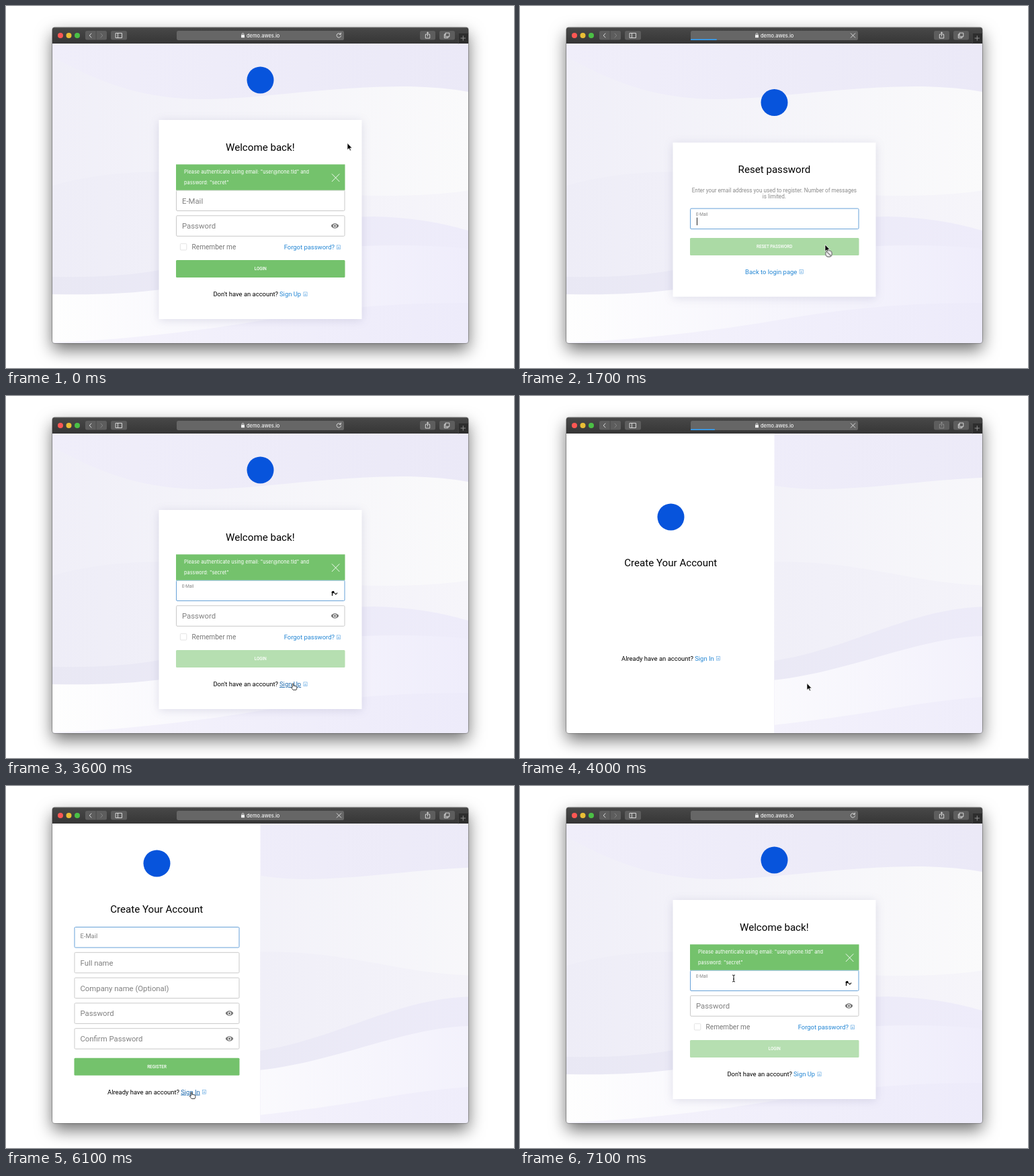
An HTML page for the animation above (7.2 s loop, 756 by 540 pixels).

```html
<!DOCTYPE html>
<html lang="en">
<head>
<meta charset="utf-8">
<title>Sign-in flow</title>
<style>
html, body { margin: 0; width: 100%; height: 100%; overflow: hidden; background: #fff; }
svg { display: block; width: 756px; height: 540px; font-family: Roboto, sans-serif; }
.ui { font-family: Inter, "Open Sans", sans-serif; }
.window { filter: drop-shadow(0 10px 12px rgba(0,0,0,.56)); }
.card { fill: #fff; filter: drop-shadow(0 2px 7px rgba(70,65,120,.15)); }
.title { font-size: 15.12px; text-anchor: middle; }
.field { fill: #fff; stroke: #c9c9c9; }
.focus .mail { stroke: #66a1d8; }
.hint { fill: #808080; font-size: 11.34px; }
.note { fill: #8a8a8a; font-size: 8.19px; text-anchor: middle; }
.text { font-size: 9.45px; }
.link { fill: #2386d4; }
.link.hover { fill: #1a68ad; text-decoration: underline; }
.caption { fill: #fff; font-size: 6.3px; font-weight: 500; text-anchor: middle; }
.button { fill: #74c26c; }
.off .button { fill: #b6dfb1; }
#reset.off .button { fill: #abdaa5; }
.key, .caret { visibility: hidden; }
.focus .key { visibility: inherit; }
.bare .form { display: none; }
.line { fill: none; stroke: #e4e4e4; stroke-width: .9; stroke-linecap: round; stroke-linejoin: round; }
.chip { fill: #5d5d5d; }
</style>
</head>
<body>
<svg id="stage" viewBox="0 0 756 540" xmlns="http://www.w3.org/2000/svg"></svg>
<script>
const LOOP = 7200, STEP = 100;

const text = (x, y, cls, s, id = '') =>
  `<text x="${x}" y="${y}" class="${cls}"${id && ` id="${id}"`}>${s}</text>`;
const rect = (x, y, w, h, attrs = '') =>
  `<rect x="${x}" y="${y}" width="${w}" height="${h}" ${attrs}/>`;
const line = (d, attrs = '') => `<path class="line" d="${d}" ${attrs}/>`;
const logo = (x, y) => `<circle cx="${x}" cy="${y}" r="20" fill="#0754dc"/>`;

const eye = (x, y) => `<g transform="translate(${x} ${y})">
  <path d="M-5.8 0C-3.2-5 3.2-5 5.8 0C3.2 5-3.2 5-5.8 0Z" fill="#757575"/>
  <circle r="2.6" fill="#fff"/><circle r="1.6" fill="#757575"/></g>`;

const glyph = (x, y) => `<g transform="translate(${x} ${y})" fill="none" stroke="#72b1e5" stroke-width=".7">
  <rect x=".4" y=".4" width="5.2" height="5.8"/><path d="M2 4.6L3 2.4L4 4.6M2 4.7H4"/></g>`;

const field = (x, y, w, label, hasEye) =>
  rect(x + .5, y + .5, w - 1, 30.5, 'rx="1.5" class="field"') +
  text(x + 9, y + 20, 'hint', label) +
  (hasEye ? eye(x + w - 15, y + 15.7) : '');

const mail = (x, y, w) =>
  rect(x + .5, y + .5, w - 1, 30.5, 'rx="1.5" class="field mail"') +
  `<text class="hint mail-label" x="${x + 9}" data-y="${y}">E-Mail</text>` +
  rect(x + 10, y + 14, 1, 11.5, 'class="caret" fill="#222"');

const button = (x, y, w, label) =>
  rect(x, y, w, 26, 'rx="1.5" class="button"') + text(x + w / 2, y + 15.2, 'caption', label);

const page = (id, back, head, form, foot) => `<g id="${id}" class="page">${back}
  <g class="head">${head}</g><g class="form">${form}</g><g class="foot">${foot}</g></g>`;

const waves = `
  <g id="waves">
    ${rect(69, 56, 620, 447, 'fill="url(#top)"')}
    <path fill="url(#mist)" d="M69 76C130 108 190 138 290 139C380 139 470 120 600 120Q650 121 688 128V503H69Z"/>
    <path fill="url(#haze)" d="M69 268C130 250 205 244 285 249C390 257 450 283 560 283Q640 283 688 275V503H69Z"/>
    <path fill="url(#band)" d="M69 404C140 405 190 402 250 390C360 365 440 314 545 314Q620 315 688 335V503H69Z"/>
    <path fill="url(#pale)" d="M69 430C130 431 180 430 245 421C350 405 440 361 533 358Q620 355 688 362V503H69Z"/>
    <path fill="url(#low)" d="M69 502C190 498 320 480 405 465Q540 442 688 443V503H69Z"/>
  </g>`;

const gradient = (id, a, b) => `<linearGradient id="${id}" gradientUnits="userSpaceOnUse" x1="69" x2="688">
  <stop stop-color="${a}"/><stop offset="1" stop-color="${b}"/></linearGradient>`;

const defs = `<defs>
  ${gradient('top', '#f0eefa', '#ebe9f7')}${gradient('mist', '#f0eff8', '#fafafb')}
  ${gradient('haze', '#eeedf7', '#f6f5fa')}${gradient('band', '#e9e8f4', '#eeecfa')}
  ${gradient('pale', '#fefefe', '#efedfb')}${gradient('low', '#f5f3fc', '#edebfa')}
  <linearGradient id="bar" x2="0" y2="1"><stop stop-color="#484848"/><stop offset="1" stop-color="#363636"/></linearGradient>
  <clipPath id="view"><path d="M69 56H688V500Q688 503 685 503H72Q69 503 69 500Z"/></clipPath>
  <clipPath id="right">${rect(378.5, 56, 310, 447)}</clipPath></defs>`;

const lights = ['#fc5753', '#e9bd35', '#4bc045']
  .map((c, i) => `<circle cx="${81 + i * 12.5}" cy="44" r="4" fill="${c}"/>`).join('');

const chrome = `
  <path fill="url(#bar)" d="M69 56V36Q69 32 73 32H684Q688 32 688 36V56Z"/>
  ${line('M72 32.4H685', 'style="stroke:#777;stroke-width:.6"')}${lights}
  ${rect(118, 37, 32, 13.5, 'rx="2.5" class="chip"')}${rect(133.7, 37, .8, 13.5, 'fill="#444"')}
  ${line('M127 41L124.2 44L127 47')}${line('M141 41L143.8 44L141 47', 'style="stroke:#898989"')}
  ${rect(156, 37, 24, 13.5, 'rx="2.5" class="chip"')}${line('M163.5 40.5H172.5V47.5H163.5ZM166.5 40.5V47.5')}
  ${rect(254, 37, 249, 14, 'rx="2.5" fill="#666"')}
  ${rect(254, 49.3, 0, 1.7, 'id="progress" fill="#359ff4"')}
  ${rect(350, 43, 5, 4.3, 'rx=".6" fill="#eee"')}${line('M351.2 43V41.8Q351.2 40.6 352.5 40.6T353.8 41.8V43')}
  <text class="ui" x="358" y="46.7" font-size="7.4" font-weight="500" fill="#f2f2f2">demo.awes.io</text>
  <g id="reload">${line('M498 42.1A3.2 3.2 0 1 0 498.5 44.6M498.3 40V42.3H496')}</g>
  <g id="stop">${line('M492.3 40.8L498.7 47.2M498.7 40.8L492.3 47.2')}</g>
  ${rect(616, 37, 23, 13.5, 'rx="2.5" class="chip"')}
  <g id="share">${line('M626 42.4H624.3V48H630.7V42.4H629M627.5 45V39.2M625.8 40.8L627.5 39.1L629.2 40.8')}</g>
  ${rect(645, 37, 23, 13.5, 'rx="2.5" class="chip"')}
  ${line('M654.3 42.2H652.3V47.7H657.8V46M654.3 40.2H659.8V45.8H654.3Z')}
  ${rect(673, 40, 15, 16, 'fill="#2d2d2d"')}${line('M673.3 56V40.3H688', 'style="stroke:#555;stroke-width:.6"')}
  ${line('M677 48H683.6M680.3 44.7V51.3', 'style="stroke:#999"')}`;

const login = page('login',
  rect(227.5, 170, 302, 297, 'class="card"'),
  logo(378.5, 110.5) + text(378.3, 215.6, 'title', 'Welcome back!'),
  mail(253, 274.5, 251.5) +
  `<path class="key" d="M486 291.2A1.7 1.7 0 1 1 486.1 294.1V298H484.9V294A1.7 1.7 0 0 1 486 291.2Z"/>
   <path class="line key" d="M488.8 293.8L490.8 295.8L492.8 293.8" style="stroke:#111;stroke-width:1.2"/>` +
  rect(253, 236.3, 251.5, 38.4, 'fill="#74c26c"') +
  `<g class="ui" fill="#fff" font-size="7.35">${text(265, 250, '', 'Please authenticate using email: "user@none.tld" and')}
   ${text(265, 266, '', 'password: "secret"')}</g>` +
  line('M485.2 250.7L496 261.7M496 250.7L485.2 261.7', 'style="stroke:#fff"') +
  field(253, 312.3, 251.5, 'Password', true) +
  rect(259.4, 354.6, 9.4, 9.4, 'rx="1" fill="#fff" stroke="#ddd" stroke-width=".8"') +
  `<text x="276.6" y="363" font-size="10.08" fill="#777">Remember me</text>` +
  text(413.7, 363, 'text link', 'Forgot password?', 'forgot') + glyph(492, 356.5) +
  button(253, 379, 251.5, 'LOGIN'),
  text(308.4, 433, 'text', "Don't have an account?") +
  text(407, 433, 'text link', 'Sign Up', 'signup') + glyph(442.5, 426.5));

const reset = page('reset',
  rect(227.5, 203.7, 302, 230, 'class="card"'),
  logo(378.5, 144) + text(378.4, 249, 'title', 'Reset password') +
  text(378.4, 277.6, 'note', 'Enter your email address you used to register. Number of messages') +
  text(378.4, 287.4, 'note', 'is limited.'),
  mail(253, 301.6, 251.5) + button(253, 346, 251.5, 'RESET PASSWORD'),
  text(335, 399.5, 'text link', 'Back to login page', 'back') + glyph(415.7, 393));

const register = page('register',
  rect(69, 56, 620, 447, 'fill="#fff"') +
  '<g clip-path="url(#right)"><use href="#waves" x="155"/></g>',
  logo(224.5, 115.5) + text(224.3, 189, 'title', 'Create Your Account'),
  mail(101.5, 210, 246) +
  ['Full name', 'Company name (Optional)', 'Password', 'Confirm Password']
    .map((s, i) => field(101.5, 247.8 + i * 37.8, 246, s, i > 1)).join('') +
  button(101.5, 405.7, 246, 'REGISTER'),
  text(151, 459.5, 'text', 'Already have an account?') +
  text(260.2, 459.5, 'text link', 'Sign In', 'signin') + glyph(292, 453));

const arrow = '<path d="M0 0V10L2.4 7.9L4 11.4L5.5 10.7L4 7.4H7.1Z" fill="#000" stroke="#fff" stroke-width=".7"/>';
const cursors = `<g id="cursor">
  <g id="arrow">${arrow}</g>
  <g id="banned">${arrow}<circle cx="5.5" cy="13.5" r="4.8" fill="#eee" stroke="#888" stroke-width="1.5"/>
    <path d="M2.2 10.2L8.8 16.8" stroke="#888" stroke-width="1.5"/></g>
  <g id="hand"><path d="M-.8.8Q0-.6.9.8V4Q2 3 2.8 4.2Q4 3.4 4.5 4.7Q5.9 4.3 5.9 5.9V7.5L4.9 10H.2L-2.7 6.3Q-2.6 4.9-.8 6.1Z"
    fill="#fff" stroke="#111" stroke-width=".8"/></g>
  <g id="beam"><path d="M-2-5Q0-5 0-4Q0-5 2-5M0-4V4M-2 5Q0 5 0 4Q0 5 2 5M-1 1H1" fill="none" stroke="#111"/></g></g>`;

const stage = document.getElementById('stage');
stage.innerHTML = defs + rect(69, 32, 619, 471, 'rx="4" class="window" fill="#333"') +
  `<g clip-path="url(#view)">${waves}${login}${reset}${register}</g>${chrome}
   <rect x="68.6" y="31.6" width="619.8" height="471.8" rx="4" fill="none" stroke="#333" stroke-opacity=".55" stroke-width=".7"/>` + cursors;

const $ = id => document.getElementById(id);
const show = (el, on) => el.style.display = on ? '' : 'none';

// start, page, time its form appears, inward shift while the form is missing
const scenes = [
  [0, 'login', 0, 0], [1000, 'reset', 1200, -11], [2500, 'login', 2800, 38.5],
  [4000, 'register', 4300, 65], [6300, 'login', 6500, 38.5]
];
const focuses = [[1200, 2300], [2900, 3750], [4400, 6000], [6500, 7300]];
const loads = [[800, 2000], [2300, 3100], [3800, 4600], [6000, 6900]];
const moves = [
  [0, 508, 204.5], [100, 507, 208], [500, 455, 354], [1500, 454, 356], [1800, 454, 356],
  [2200, 389, 398], [2700, 389, 398], [3300, 427, 428.5], [4000, 427, 428.5], [4600, 148, 224],
  [5000, 148, 224], [5700, 276, 456.5], [6400, 276, 456.5], [6900, 318, 287], [7200, 318, 287]
];
const pointers = [
  [0, 'arrow'], [500, 'hand', 'forgot'], [1000, 'arrow'], [1200, 'banned'], [1900, 'arrow'],
  [2100, 'hand', 'back'], [2500, 'arrow'], [3200, 'hand', 'signup'], [4000, 'arrow'],
  [4500, 'beam'], [5500, 'arrow'], [5600, 'hand', 'signin'], [6300, 'arrow'], [6700, 'beam']
];

const clamp = v => Math.max(0, Math.min(1, v));
const latest = (rows, t) => rows.filter(r => r[0] <= t).pop();
const within = (rows, t) => rows.find(([a, b]) => t >= a && t < b);

function pose(t) {
  const i = Math.max(1, moves.findIndex(m => m[0] > t));
  const [a, x0, y0] = moves[i - 1], [b, x1, y1] = moves[i];
  const u = clamp((t - a) / (b - a)), k = u * u * (3 - 2 * u);
  return [x0 + (x1 - x0) * k, y0 + (y1 - y0) * k];
}

function drawPage(t) {
  const [start, id, formAt, gap] = latest(scenes, t);
  const bare = t < formAt, shift = bare ? gap : 0;
  const focus = latest(focuses, t) || [-1, -1];
  const up = focus[0] < start ? 0 : clamp((t - focus[0]) / 150) * clamp(1 - (t - focus[1]) / 165);
  const active = t >= focus[0] && t < focus[1];

  for (const g of document.querySelectorAll('.page')) show(g, g.id === id);
  const g = $(id), part = s => g.querySelector(s);
  g.classList.toggle('bare', bare);
  g.classList.toggle('focus', up > 0);
  g.classList.toggle('off', active);
  part('.head').setAttribute('transform', `translate(0 ${shift})`);
  part('.foot').setAttribute('transform', `translate(0 ${-shift})`);
  const card = part('.card');
  if (card) {
    const [y, h] = id === 'login' ? [170, 297] : [203.7, 230];
    card.setAttribute('y', y + shift);
    card.setAttribute('height', h - 2 * shift);
  }
  const label = part('.mail-label');
  label.setAttribute('y', +label.dataset.y + 20 - 8.8 * up);
  label.style.fontSize = 11.34 - 5.04 * up + 'px';
  part('.caret').style.visibility = active && (t - focus[0]) % 1000 < 600 ? 'inherit' : 'hidden';
  $('share').style.opacity = start && t < start + 300 ? .35 : 1;
}

function drawLoad(t) {
  const load = within(loads, t);
  show($('stop'), load);
  show($('reload'), !load);
  let w = 0;
  if (load && t >= load[0] + 200) {
    w = 35 + (t - load[0]) / 240;
    w += (249 - w) * clamp((t - load[1] + 250) / 200);
  }
  $('progress').setAttribute('width', w);
}

function drawCursor(t) {
  const [, kind, target] = latest(pointers, t);
  for (const g of $('cursor').children) show(g, g.id === kind);
  $('cursor').setAttribute('transform', `translate(${pose(t).join(' ')})`);
  for (const a of document.querySelectorAll('.link')) a.classList.toggle('hover', a.id === target);
}

const begin = performance.now();
function tick() {
  const t = Math.floor((performance.now() - begin) % LOOP / STEP) * STEP;
  drawPage(t);
  drawLoad(t);
  drawCursor(t);
  requestAnimationFrame(tick);
}
tick();
</script>
</body>
</html>
```
